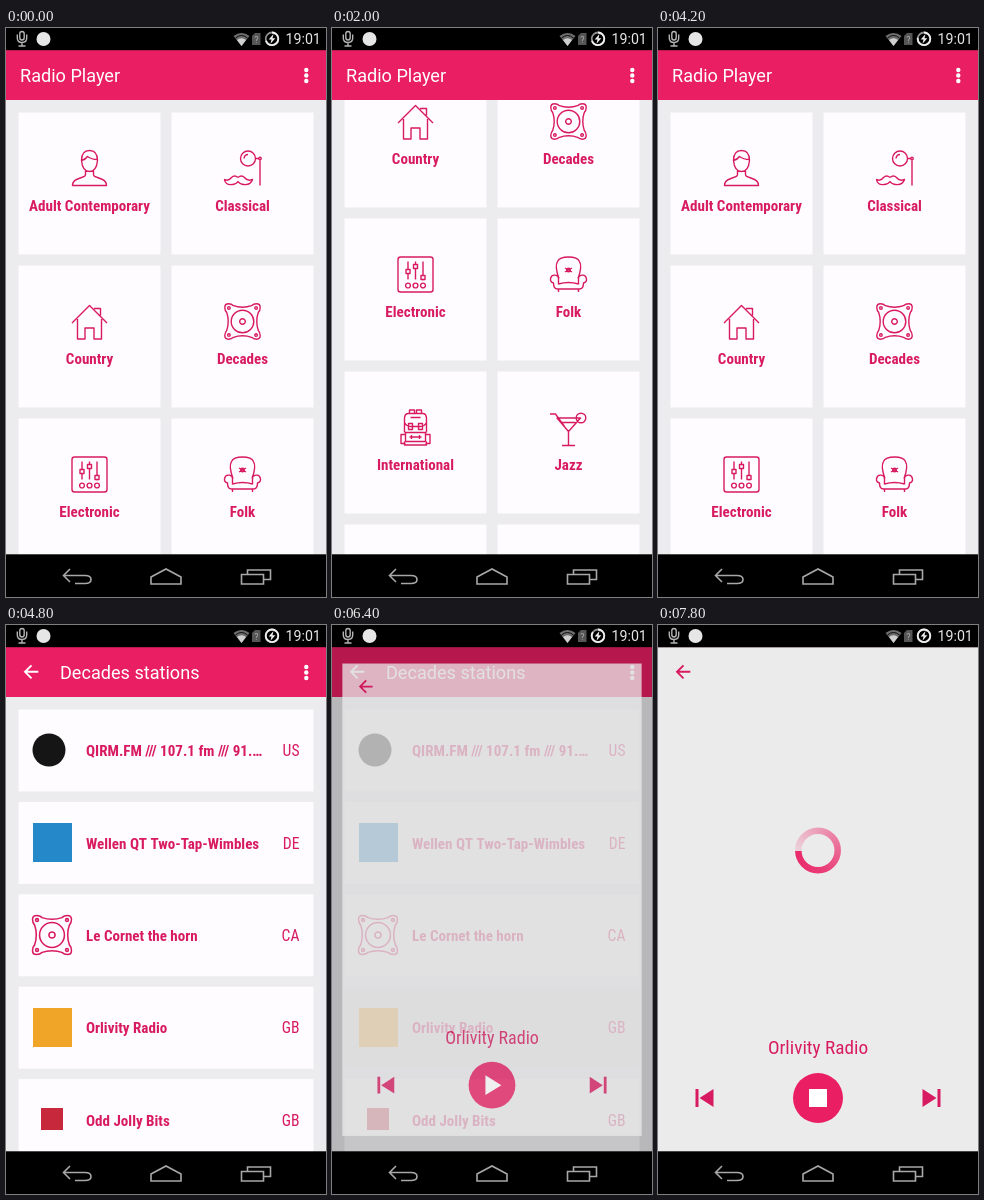
An HTML page with a canvas for the animation above (8000 ms loop, 320 px wide and 569 px high).

```html
<!DOCTYPE html>
<html lang="en">
<head>
<meta charset="utf-8">
<title>Radio Player</title>
<style>
html, body { margin: 0; width: 100%; height: 100%; overflow: hidden; background: #000; }
canvas { display: block; width: 100%; height: 100%; }
</style>
</head>
<body>
<canvas id="stage"></canvas>
<script>
const W = 320, H = 569, TOP = 22.2, BOTTOM = 526.3;
const LOOP = 8000, STEP = 200;
const PINK = '#e91e63', INK = '#d81b60', PAGE = '#ecebee', CARD = '#fefcff';
const CONDENSED = '"Roboto Condensed", Roboto, sans-serif';

const dpr = window.devicePixelRatio || 1;
const stage = document.getElementById('stage');
const layer = document.createElement('canvas');
for (const c of [stage, layer]) {
  c.width = W * dpr;
  c.height = H * dpr;
}
const main = stage.getContext('2d');
const overlay = layer.getContext('2d');
let g = main;

const circlePath = (x, y, r) => `M${x - r},${y}a${r},${r} 0 1 0 ${2 * r},0a${r},${r} 0 1 0 ${-2 * r},0`;
// A rounded tab with a screw hole, joined to the next tab by a shallow curve
const corner = (sx, sy) =>
  `M0,${sy * 14.3}Q${sx * 5},${sy * 14.3} ${sx * 9},${sy * 15.8}Q${sx * 11},${sy * 17.7} ${sx * 14},${sy * 17.7}` +
  `Q${sx * 17.7},${sy * 17.7} ${sx * 17.7},${sy * 14}Q${sx * 17.7},${sy * 11} ${sx * 15.8},${sy * 9}` +
  `Q${sx * 14.3},${sy * 5} ${sx * 14.3},0` + circlePath(sx * 13.6, sy * 13.6, 1.3);

// Line icons centred on 0,0
const icons = {
  person: 'M-8,-8Q-8,-18 0,-18Q8,-18 8,-8Q7,3 0,3Q-7,3 -8,-8M-8,-8Q-4,-9 -2,-12Q2,-9 8,-9' +
    'M-4,2V6Q-4,8 -8,9L-13,11Q-17,13 -17,17H17Q17,13 13,11L8,9Q4,8 4,6V2',
  monocle: circlePath(5.5, -10, 7.5) + 'M1.5,-10Q2,-14 5.5,-14' + circlePath(17.5, -10, 1.2) +
    'M13,-10H16M17.5,-8.5V17M-4.5,9Q-8,6 -11,9Q-14,13 -18,11Q-17,17 -10,16Q-6,15.5 -4.5,13' +
    'Q-3,15.5 1,16Q8,17 10,11Q5,13 2,9Q-1,6 -4.5,9',
  house: 'M-17.5,1.5L0,-16L17.5,1.5M-12,-2.5V17.5H-4.500V6.5H4.5V17.5H12V-2.5M4.5,-13H11V-6',
  speaker: circlePath(0, 0, 11.3) + circlePath(0, 0, 2.8) +
    corner(1, 1) + corner(1, -1) + corner(-1, 1) + corner(-1, -1),
  mixer: 'M-15,-17.5H15Q17.5,-17.5 17.5,-15V15Q17.5,17.5 15,17.5H-15Q-17.5,17.5 -17.5,15V-15Q-17.5,-17.5 -15,-17.5' +
    'M-7.5,-13V-5M-7.5,-1V5M0,-13V-10M0,-6V5M7.5,-13V1M7.5,5V6' +
    'M-9.5,-5h4v4h-4zM-2,-10h4v4h-4zM5.5,1h4v4h-4z' +
    circlePath(-7.5, 11, 2.4) + circlePath(0, 11, 2.4) + circlePath(7.5, 11, 2.4),
  chair: 'M-9.5,4Q-14,-8 -11,-13Q-9,-17.5 0,-17.5Q9,-17.5 11,-13Q14,-8 9.5,4' +
    'M-10,10V5A4,4 0 1 0 -15,8.5Q-15,14.5 -11,14.5H11Q15,14.5 15,8.5A4,4 0 1 0 10,5V10' +
    'M-10,9.5Q0,6.5 10,9.5M-10,14.5V17.5M10,14.5V17.5M-3.5,-6.5L3.5,-2.5M-3.5,-2.5L3.5,-6.5' + circlePath(0, -4.5, 1.8),
  pack: 'M-6,-14V-17.5H-1V-14M1,-14V-17.5H6V-14M-11,5V-9Q-11,-14 -7,-14H7Q11,-14 11,-9V5' +
    'M-11,-5Q-9,-1 -5,-1H5Q9,-1 11,-5M-7,-4h4v6h-4zM3,-4h4v6h-4z' +
    'M-10,5H10V14H-10zM-10,7H-14.5V16H-10M10,7H14.5V16H10M-11,14V17.5H11V14' +
    'M-6,9.5H6M-4,7.5V11.5M4,7.5V11.5M-5,-10H5',
  cocktail: 'M-11.5,-9.5H12L0,4ZM0,4V18M-6.5,18H6.5M-18.5,-13.5H-13L-4,-1M-7,-5H7' + circlePath(12.5, -9.5, 4.8)
};
for (const name in icons) icons[name] = new Path2D(icons[name]);

const genres = [
  ['Adult Contemporary', 'person'], ['Classical', 'monocle'],
  ['Country', 'house'], ['Decades', 'speaker'],
  ['Electronic', 'mixer'], ['Folk', 'chair'],
  ['International', 'pack'], ['Jazz', 'cocktail'],
  [], []
];
const STATION = 'Orlivity Radio';
const stations = [
  ['QIRM.FM /// 107.1 fm /// 91.…', 'US'],
  ['Wellen QT Two-Tap-Wimbles', 'DE'],
  ['Le Cornet the horn', 'CA'],
  [STATION, 'GB'],
  ['Odd Jolly Bits', 'GB']
];

// One size for condensed text, taken from the longest grid label
main.font = `condensed bold 100px ${CONDENSED}`;
const unit = 12100 / main.measureText(genres[0][0]).width;

const clamp = v => Math.max(0, Math.min(1, v));

function rect(x, y, w, h, color) {
  g.fillStyle = color;
  g.fillRect(x, y, w, h);
}
function disc(x, y, r, color) {
  g.fillStyle = color;
  g.beginPath();
  g.arc(x, y, r, 0, Math.PI * 2);
  g.fill();
}
function fill(d, color) {
  g.fillStyle = color;
  g.fill(new Path2D(d));
}
function line(d, color, width) {
  g.strokeStyle = color;
  g.lineWidth = width;
  g.stroke(new Path2D(d));
}
function text(str, x, y, font, color, align = 'left') {
  g.font = font;
  g.fillStyle = color;
  g.textAlign = align;
  g.fillText(str, x, y);
}
const roboto = size => `${size}px Roboto, sans-serif`;
const narrow = (scale, weight = 400) => `condensed ${weight} ${unit * scale}px ${CONDENSED}`;

function icon(name, x, y, scale = 1) {
  g.save();
  g.translate(x, y);
  g.scale(scale, scale);
  g.strokeStyle = INK;
  g.lineWidth = 1.4;
  g.lineJoin = 'round';
  g.stroke(icons[name]);
  g.restore();
}
function pageFill(color) {
  rect(0, TOP, W, BOTTOM - TOP + 1, color);
}
function backArrow(color) {
  line('M32.3,46.8H19.3M25.5,40.3L19,46.8L25.5,53.3', color, 1.9);
}
function header(title, x) {
  rect(0, TOP - 1, W, 73 - TOP, PINK);
  text(title, x, 54, roboto(18.1), '#fff');
  for (const y of [42, 47.5, 53]) disc(300.3, y, 2.2, '#fff');
}

const scrollKeys = [[200, 0], [1400, 188], [1800, 200], [2200, 200], [2600, 142.5], [3200, 0]];
function scrollAt(t) {
  for (let i = 1; i < scrollKeys.length; i++) {
    const [t0, a] = scrollKeys[i - 1], [t1, b] = scrollKeys[i];
    if (t <= t1) {
      const p = clamp((t - t0) / (t1 - t0));
      return a + (b - a) * p * p * (3 - 2 * p);
    }
  }
  return 0;
}

function genrePage(t) {
  const scroll = scrollAt(t);
  pageFill(PAGE);
  genres.forEach(([label, name], i) => {
    const x = 12.5 + (i % 2) * 153, y = 84.5 + (i >> 1) * 153 - scroll;
    if (y > BOTTOM || y < -100) return;
    rect(x, y, 142, 142, CARD);
    if (i === 3 && t >= 4400) rect(x, y, 142, 142, 'rgba(0,0,0,.07)');
    if (!label) return;
    icon(name, x + 71, y + 56);
    text(label, x + 71, y + 98.3, narrow(1, 700), INK, 'center');
  });
  if (t >= 3200 && t < 3600) {
    g.fillStyle = `rgba(233,30,99,${t < 3400 ? 0.12 : 0.06})`;
    g.beginPath();
    g.ellipse(160, 72, 190, 24, 0, 0, Math.PI);
    g.fill();
  }
  header('Radio Player', 14);
}

function stationPage(t) {
  pageFill(PAGE);
  stations.forEach(([name, country], i) => {
    const y = 84.5 + i * 92.4;
    rect(12.5, y, 295, 82, CARD);
    if (i === 3 && t >= 6000) rect(12.5, y, 295, 82, 'rgba(0,0,0,.07)');
    text(name, 80, y + 46.7, narrow(1, 700), INK);
    text(country, 293.5, y + 46.7, narrow(1.04), INK, 'right');
  });
  disc(43, 125, 16.5, '#151515');
  rect(27, 198, 39, 39, '#2588c8');
  icon('speaker', 46, 310, 1.1);
  rect(27, 383, 39, 39, '#f0a428');
  rect(35, 483, 22, 22, '#c8283c');
  header('Decades stations', 54);
  backArrow('#fff');
}

function spinner(t) {
  const head = Math.PI + (t - 7800) / 1000 * Math.PI * 2;
  const sweep = g.createConicGradient(head, 160, 225.5);
  sweep.addColorStop(0, 'rgba(233,30,99,.12)');
  sweep.addColorStop(0.7, 'rgba(233,30,99,.85)');
  sweep.addColorStop(1, 'rgba(233,30,99,.95)');
  g.strokeStyle = sweep;
  g.lineWidth = 6.5;
  g.beginPath();
  g.arc(160, 225.5, 19.7, 0, Math.PI * 2);
  g.stroke();
}

function playerPage(t) {
  pageFill('#ecebec');
  backArrow(INK);
  text(STATION, 160, 428.8, narrow(1.28), INK, 'center');
  fill('M37.5,464h3v18h-3zM55.5,464V482L41.5,473z', INK);
  fill('M279.5,464h3v18h-3zM264.5,464V482L278.5,473z', INK);
  disc(160, 473, 25, PINK);
  if (t < 6800) {
    fill('M153,462.5V483.5L170,473z', '#fff');
  } else {
    rect(151, 464, 18, 18, '#fff');
    spinner(t);
  }
}

// A new page grows and fades in above the dimmed old one
function openPage(page, t, start) {
  const p = clamp((t - start) / 300);
  if (p === 0) return;
  const scale = 0.8 + 0.2 * (1 - (1 - p) ** 3);
  g = overlay;
  g.setTransform(dpr, 0, 0, dpr, 0, 0);
  g.clearRect(0, 0, W, H);
  g.translate(160, 274.5);
  g.scale(scale, scale);
  g.translate(-160, -274.5);
  page(t);
  g = main;
  pageFill(`rgba(0,0,0,${0.7 * p})`);
  g.globalAlpha = Math.min(1, p * 2.37);
  g.drawImage(layer, 0, 0, W, H);
  g.globalAlpha = 1;
}

function statusBar(t) {
  rect(0, 0, W, TOP, '#000');
  const grey = '#b4b4b4', pale = '#e6e6e6';
  line('M13.8,5.8Q13.8,3.5 16,3.5Q18.2,3.5 18.2,5.8V9.5Q18.2,12 16,12Q13.8,12 13.8,9.5zM11.3,6.5V10Q11.3,14.5 16,14.5Q20.7,14.5 20.7,10V6.5M16,14.5V18M12.5,18H19.5', grey, 1.4);
  disc(37.5, 11, 7, pale);
  fill('M227.5,8Q235.5,2 243.5,8L235.5,18z', '#6e6e6e');
  line('M229.5,10Q235.5,5 241.5,10', '#000', 0.9);
  fill('M231,12Q235.5,8.5 240,12L235.5,18z', '#d0d0d0');
  fill('M246,8L249,5H254.5V17H246z', '#555');
  text('?', 250.3, 15, roboto(9), '#aaa', 'center');

  const charge = 0.7 + 0.3 * ((t / STEP) % 5) / 4;
  line(circlePath(266, 10.8, 6.3), '#8c8c8c', 1.8);
  g.strokeStyle = '#f0f0f0';
  g.beginPath();
  g.arc(266, 10.8, 6.3, -Math.PI / 2, Math.PI * (2 * charge - 0.5));
  g.stroke();
  fill('M267.5,6L262.7,11.5H265.5L264.5,15.8L269.3,10.2H266.5z', '#f0f0f0');
  text('19:01', 279.5, 16, roboto(14.2), pale);
}

function navBar() {
  rect(0, BOTTOM, W, H - BOTTOM, '#000');
  const grey = '#a8a8a8';
  line('M64,541L57.5,547.5L64,554M58,547.5H79Q85,547.5 85,551.5Q85,555.5 79,555.5H69', grey, 1.6);
  line('M145,549L160,541L175,549V556H145z', grey, 1.6);
  line('M235.5,546.5H257.5V556H235.5zM241.5,546V542H264.5V551.5H258', grey, 1.6);
}

function draw(t) {
  g = main;
  g.setTransform(dpr, 0, 0, dpr, 0, 0);
  if (t < 4800) genrePage(t);
  else stationPage(t);
  if (t < 4800) openPage(stationPage, t, 4506);
  openPage(playerPage, t, 6306);
  statusBar(t);
  navBar();
}

const began = performance.now();
function tick() {
  const t = (performance.now() - began) % LOOP;
  draw(Math.floor(t / STEP) * STEP);
  requestAnimationFrame(tick);
}
tick();
</script>
</body>
</html>
```
